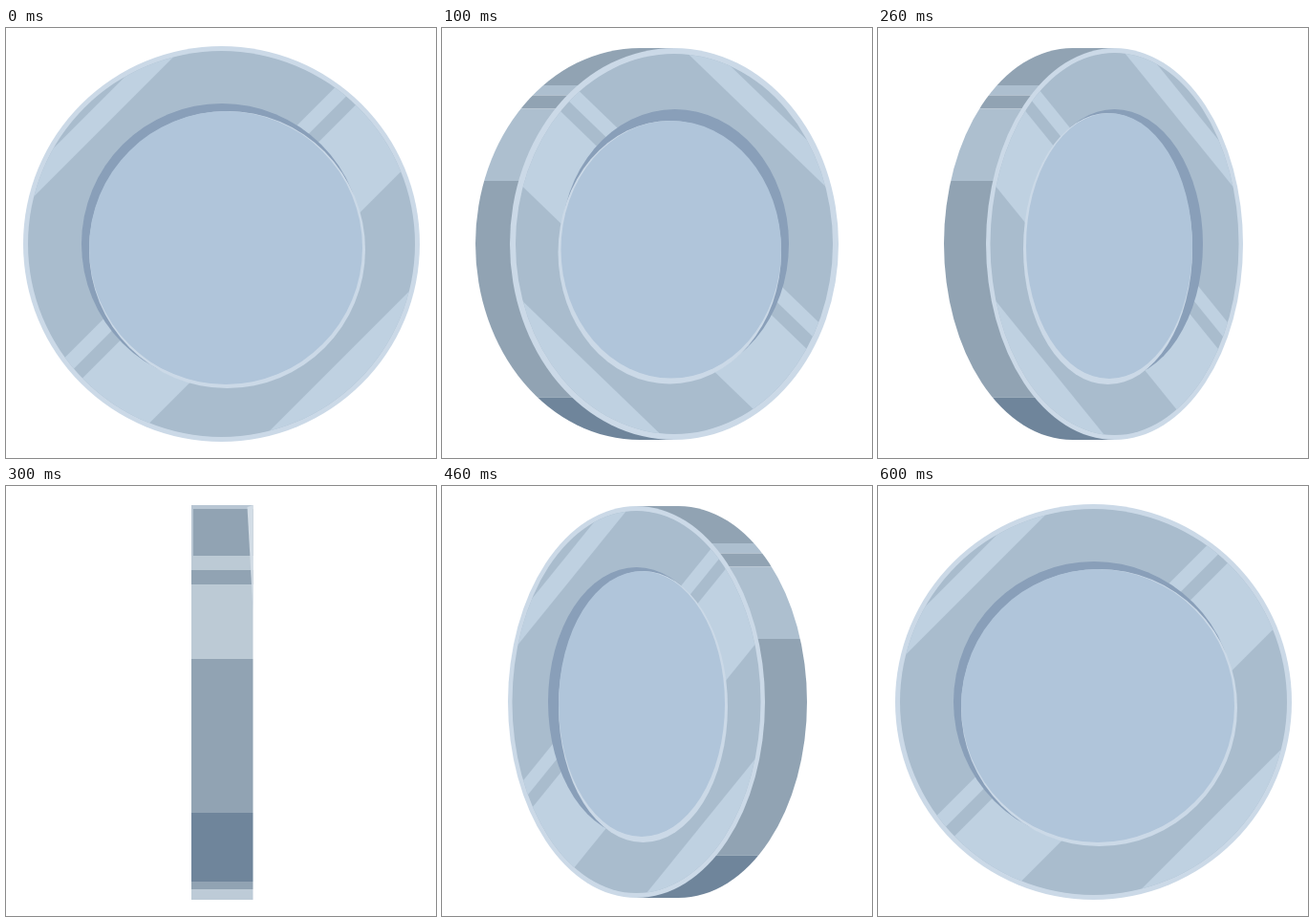
Write an HTML page with a canvas that moves like this. It is 450 px wide and 450 px high and loops after 700 ms.

```html
<!DOCTYPE html>
<html lang="en">
<head>
<meta charset="utf-8">
<title>Spinning coin</title>
<style>
html, body { margin: 0; width: 100%; height: 100%; overflow: hidden; background: #fff; }
canvas { display: block; width: 450px; height: 450px; }
</style>
</head>
<body>
<canvas id="stage" width="450" height="450"></canvas>
<script>
const ctx = document.getElementById('stage').getContext('2d');
const FACE = '#a9bccd', LIGHT = '#bfd1e1', RIM = '#cbd9e7', DISC = '#b0c5da', SHADE = '#899fb9';
const EDGE = '#91a3b3', EDGE_LIGHT = '#bccad5', EDGE_DARK = '#6f859b', SIDE_LIGHT = '#adbfcf';
const R = 207.5, MID = 226;

// Reflections run along slope * x + y = c: outer ones start at c = ±reach, inner ones at c = shift.
// hollow is the box left, top, right, bottom; shade and lit are its wall widths.
const flat = {
  x: 225.5, rx: R, ry: 207, rim: 5, depth: 0, slope: 1, reach: 246, shift: -45,
  hollow: [79, 79, 376, 377], shade: [8, 8], lit: [3, 4]
};
const tilted = { ry: 205, slope: .8, reach: 213, shift: -64 };
const half = {
  ...tilted, x: 208, rx: 172, rim: 6, depth: 36,
  hollow: [88, 85, 329.5, 372.5], shade: [8, 12], lit: [3, 6]
};
const steep = {
  ...tilted, x: 203.5, rx: 134.5, rim: 4.5, depth: 44,
  hollow: [111, 85, 299, 373], shade: [11, 4], lit: [3, 6]
};

function oval(x, y, rx, ry, color) {
  ctx.beginPath();
  ctx.ellipse(x, y, rx, ry, 0, 0, Math.PI * 2);
  ctx.fillStyle = color;
  ctx.fill();
}

const boxOval = (left, top, right, bottom, color) =>
  oval((left + right) / 2, (top + bottom) / 2, (right - left) / 2, (bottom - top) / 2, color);

// Stacked bands, each [bottom, color], from a top line down.
function bands(x, width, top, list) {
  for (const [bottom, color] of list) {
    ctx.fillStyle = color;
    ctx.fillRect(x, top, width, bottom - top);
    top = bottom;
  }
}

function reflection(slope, from, to, color = LIGHT) {
  const dy = slope * R;
  ctx.beginPath();
  ctx.moveTo(-R, from + dy);
  ctx.lineTo(R, from - dy);
  ctx.lineTo(R, to - dy);
  ctx.lineTo(-R, to + dy);
  ctx.fillStyle = color;
  ctx.fill();
}

function drawSide({ x, rx, ry, depth }) {
  ctx.save();
  ctx.beginPath();
  ctx.ellipse(x + depth, MID, rx, ry, 0, -Math.PI / 2, Math.PI / 2);
  ctx.lineTo(x, MID + ry);
  ctx.lineTo(x, MID - ry);
  ctx.clip();
  bands(x, 250, 20, [[60, EDGE], [70.5, SIDE_LIGHT], [84.5, EDGE], [160, SIDE_LIGHT],
    [386.5, EDGE], [432, EDGE_DARK]]);
  ctx.restore();
}

function drawHollow({ hollow: [left, top, right, bottom], shade, lit }) {
  const innerLeft = left + shade[0], innerTop = top + shade[1];
  const innerRight = right - lit[0], innerBottom = bottom - lit[1];
  boxOval(left, top, innerRight, innerBottom, SHADE);
  boxOval(innerLeft, innerTop, right, bottom, RIM);
  boxOval(innerLeft, innerTop, innerRight, innerBottom, DISC);
}

function drawFace(pose) {
  const { x, rx, ry, rim, slope, reach, shift } = pose;
  oval(x, MID, rx, ry, RIM);
  ctx.save();
  oval(x, MID, rx - rim, ry - Math.max(rim, 5), FACE);
  ctx.clip();
  ctx.translate(x, MID);
  ctx.scale(rx / R, 1);
  reflection(slope, -reach - 30, -reach);
  reflection(slope, shift, shift + 21);
  reflection(slope, shift + 40, shift + 157);
  reflection(slope, reach, 2 * reach);
  ctx.restore();
  drawHollow(pose);
}

function drawEdgeOn() {
  const x = 194, width = 64.5;
  bands(x, width, 20, [[24, '#b8c6d3'], [73, EDGE], [88, EDGE_LIGHT], [103, EDGE], [181, EDGE_LIGHT],
    [342, EDGE], [414, EDGE_DARK], [422, EDGE], [433, '#bdcbd7']]);
  bands(x, 2, 20, [[73, '#b8c6d3']]);
  ctx.beginPath();
  ctx.moveTo(x + width - 6, 22);
  ctx.lineTo(x + width, 20);
  ctx.lineTo(x + width, 130);
  ctx.fillStyle = '#d3dde6';
  ctx.fill();
}

function drawCoin(pose, mirrored) {
  ctx.save();
  if (mirrored) ctx.setTransform(-1, 0, 0, 1, 451, 0);
  if (pose.depth) drawSide(pose);
  drawFace(pose);
  ctx.restore();
}

const turn = [
  () => drawCoin(flat),
  () => drawCoin(half, true),
  () => drawCoin(steep, true),
  drawEdgeOn,
  () => drawCoin(steep),
  () => drawCoin(half),
  () => drawCoin(flat)
];

function render() {
  ctx.fillStyle = '#fff';
  ctx.fillRect(0, 0, 450, 450);
  turn[Math.floor(performance.now() % 700 / 100)]();
  requestAnimationFrame(render);
}
render();
</script>
</body>
</html>
```
